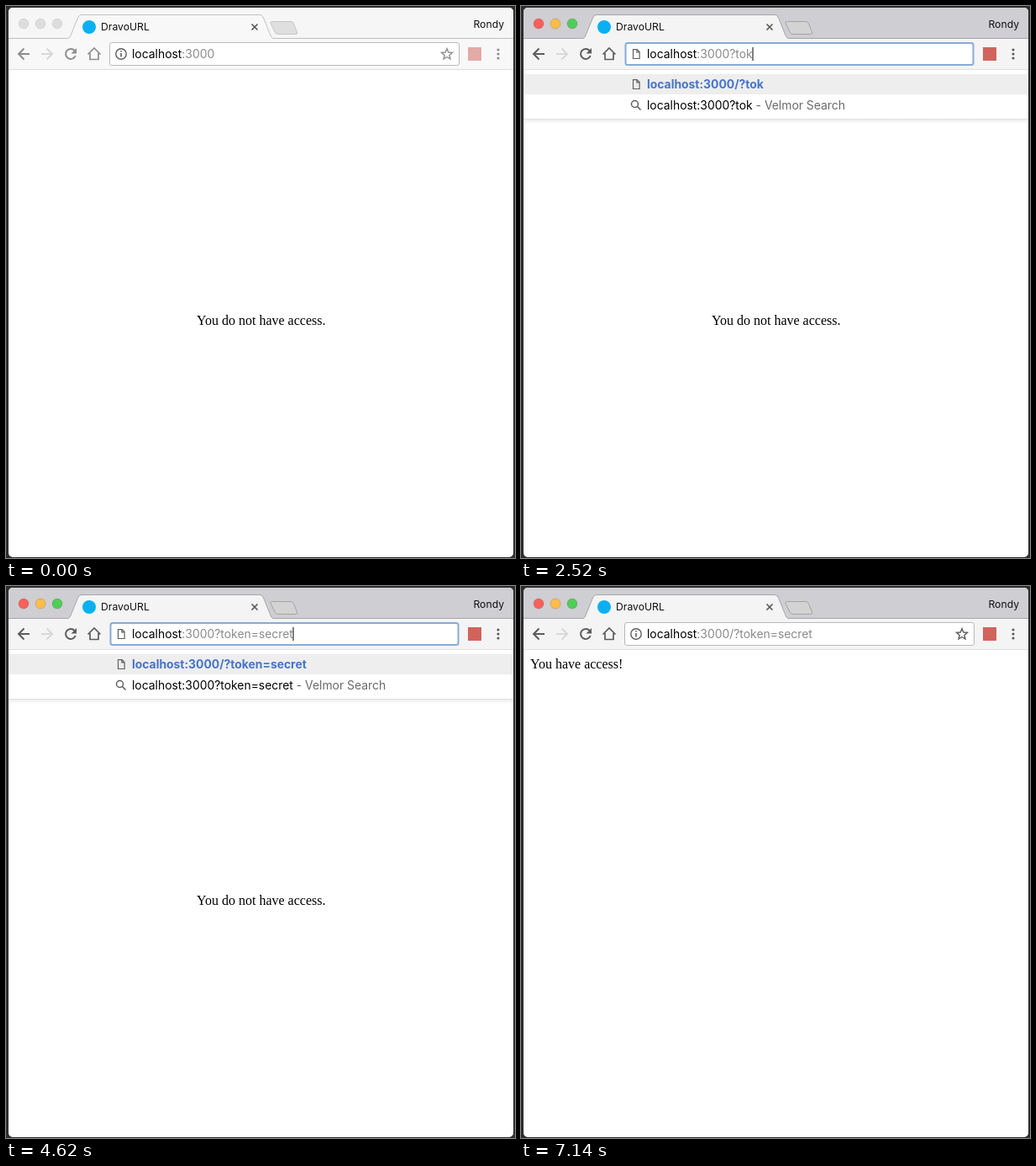
Recreate the animation shown at these times as an HTML page. Size 606 px wide and 656 px high, loop 7210 ms.

```html
<!DOCTYPE html>
<html lang="en">
<head>
<meta charset="utf-8">
<title>Login by address</title>
<style>
  html, body { margin: 0; width: 100%; height: 100%; overflow: hidden; background: #2d2d2d; }
  svg {
    display: block; width: 606px; height: 656px;
    font: 13.9px Inter, Roboto, sans-serif;
    --frame: #cfced2; --bar: #f4f4f4; --edge: #a6a6a8; --icon: #5c5c5c;
    --red: #fb5f5c; --yellow: #fcbc4b; --green: #50cd58; --rim: #0002;
    --plus: #d3d3d3; --plusEdge: #a3a3a3; --ext: #d0645c; --name: #111;
  }
  svg.idle {
    --frame: #f6f6f6; --bar: #f8f8f8; --edge: #c0c0c0; --icon: #8e8e8e;
    --red: #dddddd; --yellow: #dddddd; --green: #dddddd; --rim: #0001;
    --plus: #dfdfdf; --plusEdge: #c6c6c6; --ext: #e3aaa6;
  }
  svg.blank { --ext: #e0e0e0; }
  text { white-space: pre; }
  .small { font-size: 12.2px; fill: var(--name); }
  .page { font: 16px "Liberation Serif", "Times New Roman", serif; fill: #000; }
  .line { fill: none; stroke: var(--icon); stroke-width: 2; }
  .thin { fill: none; stroke: #5f5f5f; stroke-width: 1.2; }
  .grey { fill: #8a8a8a; }
</style>
</head>
<body>
<svg id="stage" viewBox="0 0 606 656">
  <defs>
    <clipPath id="round"><rect x="3" y="2" width="601" height="653" rx="5"/></clipPath>
    <linearGradient id="shade" x2="0" y2="1">
      <stop stop-color="#d9d9d9"/><stop offset=".25" stop-color="#efefef"/><stop offset="1" stop-color="#fff"/>
    </linearGradient>
    <path id="sheet" class="thin" d="M133.5 51.6h4.6l3 3v7.9h-7.6zM137.9 51.6v3.2h3.2"/>
  </defs>
  <rect width="606" height="656" fill="#2d2d2d"/>
  <g clip-path="url(#round)">
    <rect x="3" y="2" width="601" height="653" fill="#fff"/>
    <rect x="3" y="2" width="601" height="37" fill="var(--frame)"/>
    <rect x="3" y="39" width="601" height="36" fill="var(--bar)"/>
    <path d="M3 75.5H604" stroke="#dedede"/>
    <path d="M3 38.5H74Q76 38 77 35L85.5 14Q87 10.500 90 10.500H302Q305 10.500 306.500 14L315 35Q316 38 318 38.500H604V40H3Z" fill="var(--bar)"/>
    <path d="M3 38.5H74Q76 38 77 35L85.5 14Q87 10.500 90 10.500H302Q305 10.500 306.500 14L315 35Q316 38 318 38.500H604" fill="none" stroke="var(--edge)"/>
    <path d="M316.500 18.500H339Q341.500 18.500 342.500 21L346.500 31Q347.500 33.500 345 33.500H324Q321 33.500 320 31L315 20.500Q314.500 18.500 316.500 18.500Z" fill="var(--plus)" stroke="var(--plusEdge)"/>
    <g stroke="var(--rim)">
      <circle cx="21" cy="21" r="6" fill="var(--red)"/>
      <circle cx="41" cy="21" r="6" fill="var(--yellow)"/>
      <circle cx="61" cy="21" r="6" fill="var(--green)"/>
    </g>
    <circle id="favicon" cx="99" cy="25" r="8" fill="#0bb0f2"/>
    <path id="spinner" fill="none" stroke-width="2"/>
    <text class="small" x="113" y="29">DravoURL</text>
    <text class="small" x="593" y="26" text-anchor="end">Rondy</text>
    <path d="M292.500 21.500l7 7m0-7l-7 7" stroke="#5a5a5a" stroke-width="1.7"/>

    <path class="line" d="M28 57H15.500M21.500 50.500L15 57l6.500 6.500"/>
    <path class="line" style="stroke:#d8d8d8" d="M42 57h12.500M48.500 50.500L55 57l-6.500 6.500"/>
    <g id="reload">
      <path class="line" d="M81.600 53A6 6 0 1 0 82.700 59"/>
      <path d="M84 50v6.500h-6.500z" fill="var(--icon)"/>
    </g>
    <path id="stop" class="line" d="M71.500 51.500l11 11m0-11l-11 11"/>
    <path class="line" style="stroke-width:1.7" d="M97.500 57.500L105 50l7.500 7.500M100 56v7.500h10V56"/>

    <rect id="box" x="123.500" y="43.500" width="416" height="27" rx="2.500" fill="#fff" stroke="#b9b9b9"/>
    <rect id="focus" x="124.500" y="44" width="414" height="26" rx="2.500" fill="#fff" stroke="#86abd6" stroke-width="2"/>
    <g id="info">
      <circle cx="137" cy="57" r="6.200" fill="none" stroke="#5c5c5c" stroke-width="1.400"/>
      <path d="M137 56v4.500M137 53v1.600" stroke="#5c5c5c" stroke-width="1.600"/>
    </g>
    <use id="draft" href="#sheet"/>
    <text id="address" x="150" y="62">localhost<tspan id="rest" class="grey"></tspan></text>
    <rect id="caret" y="49" width="1" height="16"/>
    <polygon id="star" class="line" style="stroke-width:1.400"/>
    <rect x="550" y="49" width="16" height="16" fill="var(--ext)"/>
    <g fill="var(--icon)">
      <circle cx="586" cy="52" r="1.600"/><circle cx="586" cy="57" r="1.600"/><circle cx="586" cy="62" r="1.600"/>
    </g>

    <text id="denied" class="page" x="227" y="379">You do not have access.</text>
    <text id="granted" class="page" x="11" y="98">You have access!</text>

    <g id="menu">
      <rect x="3" y="76" width="601" height="58" fill="#fff"/>
      <rect x="3" y="81" width="601" height="24" fill="#eeeeee"/>
      <rect x="3" y="134" width="601" height="6" fill="url(#shade)"/>
      <use href="#sheet" y="36"/>
      <circle class="thin" style="stroke-width:1.500" cx="135.500" cy="116.500" r="4"/>
      <path class="thin" style="stroke-width:1.700" d="M138.500 119.500l4 4"/>
      <text id="match" x="150" y="98" font-weight="700" fill="#4674cb"></text>
      <text x="150" y="123"><tspan id="query"></tspan><tspan fill="#6a6a6a"> - Velmor Search</tspan></text>
    </g>
  </g>
</svg>
<script>
const LOOP = 7210, STEP = 70;
const FOCUS = 980, ENTER = 4690, RECEIVE = 4830, DONE = 5180;
const TYPED = '?token=secret';
const KEYS = [1820, 2240, 2380, 2520, 2730, 2870, 3290, 3780, 3920, 4060, 4200, 4340, 4480];

const $ = id => document.getElementById(id);
const show = (id, on) => $(id).style.display = on ? '' : 'none';
const write = (id, text) => { if ($(id).textContent !== text) $(id).textContent = text; };

function polar(cx, cy, r, degrees) {
  const a = degrees * Math.PI / 180;
  return (cx + r * Math.cos(a)).toFixed(2) + ' ' + (cy + r * Math.sin(a)).toFixed(2);
}

$('star').setAttribute('points', Array.from({ length: 10 }, (_, i) =>
  polar(525, 57.5, i % 2 ? 3 : 6.8, i * 36 - 90)).join(' '));

function drawSpinner(t) {
  const receiving = t >= RECEIVE;
  const age = t - (receiving ? RECEIVE : ENTER);
  const start = receiving ? -105 + age * 360 / 1568 : -90 - age * 360 / 1320;
  const sweep = receiving ? Math.min(270, 5 + age * 0.54) : 180;
  const arc = `M${polar(99, 25, 6.5, start)}A6.5 6.5 0 ${sweep > 180 ? 1 : 0} 1 ${polar(99, 25, 6.5, start + sweep)}`;
  $('spinner').setAttribute('d', arc);
  $('spinner').setAttribute('stroke', receiving ? '#4d88c7' : '#909090');
}

function render(time) {
  const t = Math.floor(time % LOOP / STEP) * STEP;
  const count = KEYS.filter(k => k <= t).length;
  const focused = t >= FOCUS && t < ENTER;
  const typing = focused && count > 0;
  const loading = t >= ENTER && t < DONE;
  const query = TYPED.slice(0, count);

  $('stage').setAttribute('class', t < FOCUS ? 'idle' : loading && t >= RECEIVE ? 'blank' : '');
  show('box', !focused);
  show('focus', focused);
  show('info', !typing);
  show('draft', typing);
  show('star', !typing);
  show('menu', typing);
  show('favicon', !loading);
  show('spinner', loading);
  show('reload', !loading);
  show('stop', loading);
  show('denied', t < DONE);
  show('granted', t >= DONE);

  write('rest', ':3000' + (t >= ENTER ? '/' : '') + query);
  write('match', 'localhost:3000/' + query);
  write('query', 'localhost:3000' + query);

  const lastInput = count ? KEYS[count - 1] : FOCUS;
  show('caret', focused && (t - lastInput) % 1000 < 500);
  $('caret').setAttribute('x', Math.round(150 + $('address').getComputedTextLength()) - 0.5);
  if (loading) drawSpinner(t);
}

const origin = performance.now();
function tick() {
  render(performance.now() - origin);
  requestAnimationFrame(tick);
}
tick();
</script>
</body>
</html>
```
